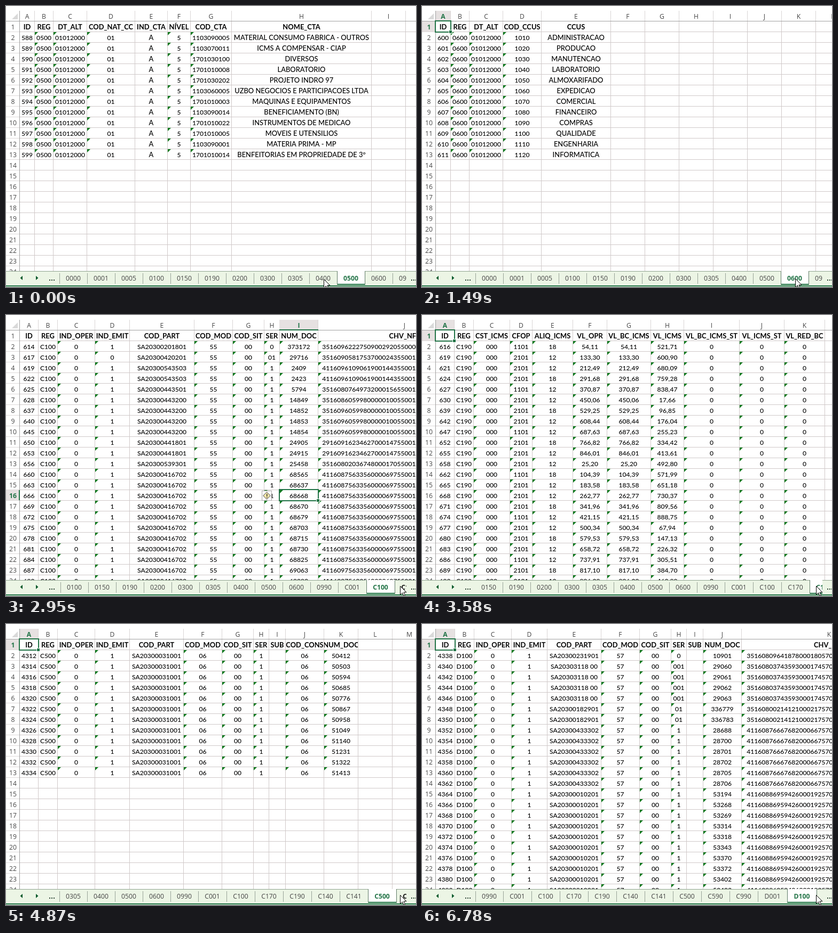
Recreate the animation shown at these times as an HTML page with a canvas. Size 768 px wide and 528 px high, loop 6.84 s.

```html
<!DOCTYPE html>
<html lang="pt">
<head>
<meta charset="utf-8">
<title>Planilha</title>
<style>
html, body { margin: 0; width: 768px; height: 528px; overflow: hidden; background: #fff; }
canvas { display: block; }
</style>
</head>
<body>
<canvas id="stage" width="768" height="528"></canvas>
<script>
const ctx = document.getElementById('stage').getContext('2d');
const LOOP = 6840, GREEN = '#217346', GRID = '#d0c9c9', EDGE = '#a0a0a0';
const UI = '12.2px "Open Sans", "Noto Sans", sans-serif';

// ---- Sheet contents ----
const seq = (n, make) => Array.from({ length: n }, (_, i) => make(i));
const lines = text => text.trim().split('\n').map(line => line.trim().split('|'));
const sheet = (head, widths, rows, selected = [0, 0]) =>
  ({ widths, selected, rows: [head.split('|'), ...rows] });
const docs = blocks => lines(blocks).flatMap(([part, series, key, numbers]) =>
  numbers.split(' ').map(number => ({ part, series, key: key.padEnd(44, '0010037'), number })));
const money = i => ((i * 7919 + 4211) % 90000 / 100 + 12).toFixed(2).replace('.', ',');

const accounts = lines(`
  A|1103090005|MATERIAL CONSUMO FABRICA - OUTROS
  A|1103070011|ICMS A COMPENSAR - CIAP
  A|1701030100|DIVERSOS
  A|1701010008|LABORATORIO
  A|1701030202|PROJETO INDRO 97
  A|1103060005|UZBO NEGOCIOS E PARTICIPACOES LTDA
  A|1701010003|MAQUINAS E EQUIPAMENTOS
  A|1103090014|BENEFICIAMENTO (BN)
  A|1701010022|INSTRUMENTOS DE MEDICAO
  A|1701010005|MOVEIS E UTENSILIOS
  A|1103090001|MATERIA PRIMA - MP
  A|1701010014|BENFEITORIAS EM PROPRIEDADE DE 3º`);

const operations = lines(`
  1FU|COMPRA MATERIA PRIMA
  1FO|COMPRA PARA INDUSTRI
  4CE|RET CONSERTO C/ESTOQ
  4DA|RETORNO DE VASILHAME
  1DA|COMPRA DE INDUSTRIAL
  4BA|RETORNO DE BENEFICIA
  1EH|COMPRA DE MATERIAL D
  4FD|RETORNO AMAZENAGEM
  4B1|OUTRAS ENTRADAS
  3CA|ENTRADA DE VASILHAME
  4ZC|ENTRADA COMB EMP
  1AD|COMPRA DE ATIVO IMOB
  1FS|COMPRA PARA INDUSTRI
  1EP|COMPRA DE MATERIAL D
  1FN|COMPRA PARA INDUSTRI
  2EF|ENTRADA DE EMPRESTIM
  1FP|COMPRA PARA INDUSTRI
  2BH|DEVOLUCAO DE VENDAS
  1EQ|COMPRA MATERIAL
  4GP|ENTRADA DE TRANSFERE
  1WY|ENTRADA PARA INDUSTR
  3IC|ENTRADA PARA INDUSTR
  1BJ|COMPRA DE SERVICOS D`);

const centers = ['ADMINISTRACAO', 'PRODUCAO', 'MANUTENCAO', 'LABORATORIO', 'ALMOXARIFADO', 'EXPEDICAO',
  'COMERCIAL', 'FINANCEIRO', 'COMPRAS', 'QUALIDADE', 'ENGENHARIA', 'INFORMATICA'];

const invoices = docs(`
  SA20300201801|0|3516096222750900292055000|373172
  SA20300420201|01|3516090581753700024355001|29716
  SA20300543503|1|4116096109061900144355001|2409 2423
  SA20300443501|1|3516080764973200015655001|5794
  SA20300443200|1|3516086059980000010055001|14849
  SA20300443200|1|3516096059980000010055001|14852 14853 14854
  SA20300441801|1|2916091623462700014755001|24905 24915
  SA20300539301|1|3516080203674800017055001|25458
  SA20300416702|1|4116087563356000069755001|68565 68637 68668 68670 68679 68703 68715 68730 68825
  SA20300416702|1|4116097563356000069755001|69063 69083`);
const invoiceIds = '614 617 619 622 625 628 637 640 645 650 653 656'.split(' ')
  .concat(seq(11, i => String(660 + 3 * i)));

const freights = docs(`
  SA20300231901|0|35160809641878000180570|10901
  SA20303118 00|001|35160803743593000174570|29060 29061 29062 29063
  SA20300182901|01|35160800214121000217570|336779 336783
  SA20300433302|1|41160876667682000667570|28688 28700 28701 28702 28705 28706
  SA20300010201|1|41160886959426000192570|53194 53268 53269 53314 53318 53343 53370 53372 53402 53403`);

const titles = lines(`
  1231|3|2280|006873|
  1236|24|7492|006857|
  1258|23756|424,65|006018|003
  1336|23782|509,58|006018|003
  1737|23829|339,72|006018|003
  1973|10020|13342,45|005413|
  1982|23865|594,51|006018|003
  2382|23895|509,58|006018|003
  2387|23941|509,58|006018|003
  2500|223|681,5|004358|2
  2549|9286|755|004219|`);

const taxHead = 'ID|REG|CST_ICMS|CFOP|ALIQ_ICMS|VL_OPR|VL_BC_ICMS|VL_ICMS|VL_BC_ICMS_ST|VL_ICMS_ST|VL_RED_BC';
const taxWidths = [35, 36, 68, 42, 76, 64, 82, 62, 104, 84, 76];
const taxRow = (id, reg, cfop, i) =>
  [String(id), reg, '000', cfop, i % 3 ? '12' : '18', money(i), money(i), money(i + 40), '0', '0', '0'];

const sheets = {
  '0400': sheet('ID|REG|COD_NAT|DESCR_NAT', [28, 35, 67, 168],
    operations.map((op, i) => [String(562 + i), '0400', ...op])),
  '0500': sheet('ID|REG|DT_ALT|COD_NAT_CC|IND_CTA|NÍVEL|COD_CTA|NOME_CTA', [28, 35, 63, 90, 61, 43, 77, 262],
    accounts.map(([kind, code, name], i) => [String(588 + i), '0500', '01012000', '01', kind, '5', code, name])),
  '0600': sheet('ID|REG|DT_ALT|COD_CCUS|CCUS', [28, 35, 63, 72, 130],
    centers.map((name, i) => [String(600 + i), '0600', '01012000', String(1010 + i * 10), name])),
  '0990': sheet('ID|REG|QTD_LIN_0', [28, 35, 74], [['612', '0990', '612']]),
  C001: sheet('ID|REG|IND_MOV', [28, 36, 63], [['613', 'C001', '0']]),
  C100: sheet('ID|REG|IND_OPER|IND_EMIT|COD_PART|COD_MOD|COD_SIT|SER|NUM_DOC|CHV_NFE',
    [35, 36, 70, 65, 121, 72, 59, 29, 72, 324],
    invoices.map((d, i) => [invoiceIds[i], 'C100', '0', i === 1 ? '0' : '1', d.part, '55', '00', d.series, d.number, d.key]),
    [8, 15]),
  C170: sheet('ID|REG|NUM_ITEM|COD_ITEM|DESCR_COMPL|QTD|UNID|VL_ITEM|VL_DESC|IND_MOV|CST_ICMS',
    [35, 36, 70, 92, 170, 56, 42, 64, 60, 63, 68],
    invoiceIds.map((id, i) => [String(+id + 1), 'C170', '1', String(10020314 + i * 37), operations[i][1],
      String(1 + i * 7 % 40), 'UN', money(i), '0', '0', '000'])),
  C190: sheet(taxHead, taxWidths, invoiceIds.map((id, i) => taxRow(+id + 2, 'C190', i % 4 ? '2101' : '1101', i))),
  C140: sheet('ID|REG|IND_EMIT|IND_TIT|DESC_TIT|NUM_TIT|QTD_PARC|VL_TIT|Participante|Número da NF|Modelo|Série',
    [35, 36, 67, 55, 63, 70, 73, 60, 64, 64, 64, 64],
    titles.map(([id, number, value, part, series]) => [id, 'C140', '1', '00', '', number.padStart(9, '0'), '1',
      value, `SA203${part}01`, number, '01', series])),
  C141: sheet('ID|REG|NUM_PARC|DT_VCTO|VL_PARC', [35, 36, 74, 66, 64],
    titles.map(([id, , value], i) => [String(+id + 1), 'C141', '01', `${10 + i}102016`, value])),
  C500: sheet('ID|REG|IND_OPER|IND_EMIT|COD_PART|COD_MOD|COD_SIT|SER|SUB|COD_CONS|NUM_DOC',
    [35, 36, 70, 65, 101, 72, 59, 29, 31, 72, 64],
    seq(12, i => [String(4312 + 2 * i), 'C500', '0', '1', 'SA20300031001', '06', '00', '1', '', '06', String(50412 + i * 91)])),
  C590: sheet(taxHead, taxWidths, seq(12, i => taxRow(4313 + 2 * i, 'C590', '1252', i + 30))),
  C990: sheet('ID|REG|QTD_LIN_C', [35, 36, 75], [['4336', 'C990', '3724']]),
  D001: sheet('ID|REG|IND_MOV', [35, 36, 63], [['4337', 'D001', '0']]),
  D100: sheet('ID|REG|IND_OPER|IND_EMIT|COD_PART|COD_MOD|COD_SIT|SER|SUB|NUM_DOC|CHV_CTE',
    [36, 36, 70, 67, 101, 72, 59, 29, 31, 72, 328],
    freights.map((d, i) => [String(4338 + 2 * i), 'D100', '0', '1', d.part, '57', '00', d.series, '', d.number, d.key]))
};

// ---- Timeline ----
const tabs = ('0000 0001 0005 0100 0150 0190 0200 0300 0305 0400 0500 0600 0990 ' +
  'C001 C100 C170 C190 C140 C141 C500 C590 C990 D001 D100 D190').split(' ');
const tabWidth = name => ({ C: 53, D: 55 })[name[0]] || 52;

// start, sheet, duration of the tab strip's slide
const visits = [[0, '0500'], [590, '0400'], [1080, '0500'], [1460, '0600'], [1920, '0990', 150],
  [2480, 'C001', 150], [2830, 'C100', 180], [3170, 'C170', 150], [3580, 'C190', 210], [4020, 'C140', 120],
  [4400, 'C141', 150], [4750, 'C500', 150], [5130, 'C590', 120], [5480, 'C990', 150], [5890, 'D001', 150],
  [6240, 'D100', 150]];

// start, end, from, to
const moves = [[590, 950, [595, 513], [648, 513]], [1080, 1260, [648, 513], [698, 512]],
  [1460, 1760, [698, 512], [735, 510]], [2200, 2480, [735, 510], [738, 509]]];

function pointerAt(t) {
  const [start, end, from, to] = moves.filter(m => m[0] <= t).pop() || moves[0];
  const p = Math.min(1, Math.max(0, (t - start) / (end - start)));
  const eased = p * p * (3 - 2 * p);
  return from.map((v, i) => Math.round(v + (to[i] - v) * eased));
}

// ---- Drawing ----
function rect(x, y, w, h, color) {
  ctx.fillStyle = color;
  ctx.fillRect(x, y, w, h);
}
function shape(points, color) {
  ctx.beginPath();
  points.forEach(([x, y]) => ctx.lineTo(x, y));
  ctx.closePath();
  ctx.fillStyle = color;
  ctx.fill();
}
function label(text, x, y, font, color) {
  ctx.font = font;
  ctx.fillStyle = color;
  ctx.fillText(text, x, y);
}
function clipped(x, y, w, h, draw) {
  ctx.save();
  ctx.beginPath();
  ctx.rect(x, y, w, h);
  ctx.clip();
  draw();
  ctx.restore();
}

function drawCell(text, x, y, width, isHead) {
  const numeric = /^[\d,]+$/.test(text);
  const size = numeric || /\d{3}/.test(text) ? 12.1 : 12.9;
  clipped(x + 1, y, width - 1, 19, () =>
    label(text, x + (width + 1) / 2, y + 15, `${isHead ? 700 : 500} ${size}px Lato, sans-serif`, '#000'));
  return numeric;
}

function drawSheet({ widths, rows, selected }, showSelection) {
  const edges = [25];
  for (let c = 0; edges[c] < 768; c++) edges.push(edges[c] + (widths[c] || 64));
  const [selCol, selRow] = showSelection ? selected : [-1, -1];

  shape([[22, 14], [22, 25], [11, 25]], '#d9d9d9');
  for (let c = 0; c + 1 < edges.length; c++) {
    const x = edges[c], w = edges[c + 1] - x, active = c === selCol;
    if (active) rect(x, 9, w, 19, '#e6e1e1');
    rect(x + w, 9, 1, 19, '#d9d5d5');
    rect(x + w, 29, 1, 469, GRID);
    label(String.fromCharCode(65 + c), x + (w + 1) / 2, 24, (active ? 'bold ' : '') + UI, active ? GREEN : '#444');
  }
  for (let r = 0; r < 24; r++) {
    const y = 29 + 20 * r, active = r === selRow;
    if (active) rect(0, y, 25, 19, '#e6e1e1');
    rect(0, y + 19, 25, 1, '#dedada');
    rect(26, y + 19, 742, 1, GRID);
    label(r + 1, 13, y + 15, (active ? 'bold ' : '') + UI, active ? GREEN : '#444');
  }
  rect(25, 9, 1, 489, EDGE);
  rect(0, 28, 768, 1, EDGE);

  rows.forEach((row, r) => row.forEach((text, c) => {
    if (!text || edges[c] >= 768) return;
    const x = edges[c], y = 29 + 20 * r;
    const numeric = drawCell(text, x, y, edges[c + 1] - x, r === 0);
    if (numeric && c > 0) shape([[x + 1, y], [x + 7, y], [x + 1, y + 6]], '#0f7a1f');
  }));

  if (showSelection) drawSelection(edges[selCol], 29 + 20 * selRow, edges[selCol + 1]);
}

function drawSelection(x, y, right) {
  rect(x, 27, right - x + 1, 2, GREEN);
  rect(24, y, 2, 19, GREEN);
  ctx.strokeStyle = GREEN;
  ctx.lineWidth = 2;
  ctx.strokeRect(x, y - 1, right - x + 1, 21);
  rect(right - 3, y + 16, 7, 7, '#fff');
  rect(right - 2, y + 17, 5, 5, GREEN);
  if (x > 25) drawWarning(x - 33, y + 1);
}

function drawWarning(x, y) {
  rect(x, y, 19, 19, '#ababab');
  rect(x + 1, y + 1, 17, 17, '#fafafa');
  shape([[x + 9.5, y + 2], [x + 17, y + 9.5], [x + 9.5, y + 17], [x + 2, y + 9.5]], '#777');
  shape([[x + 9.5, y + 3.5], [x + 15.5, y + 9.5], [x + 9.5, y + 15.5], [x + 3.5, y + 9.5]], '#f8e7a8');
  rect(x + 9, y + 6, 1.5, 5, '#333');
  rect(x + 9, y + 12, 1.5, 1.5, '#333');
}

function drawTabs(current, offset, hoverX) {
  rect(0, 498, 768, 30, '#ecf5e5');
  rect(0, 498, 768, 1, '#8fa38f');
  rect(0, 525, 768, 2, GREEN);
  shape([[31, 507], [31, 515], [26.5, 511]], '#0b5a2c');
  shape([[56, 507], [56, 515], [60.5, 511]], '#0b5a2c');
  for (const start of [81, 759]) for (let i = 0; i < 3; i++) rect(start + i * 4, 514, 2, 2, '#26402f');

  const first = Math.max(0, tabs.indexOf(current) - 11);
  clipped(100, 498, 650, 27, () => {
    let x = 100 + Math.round(offset) - (first ? tabWidth(tabs[first - 1]) : 0);
    for (const name of tabs.slice(Math.max(0, first - 1))) {
      const w = tabWidth(name), active = name === current;
      const hovered = hoverX >= x && hoverX < x + w;
      if (active) {
        rect(x, 498, w + 1, 26, '#5f7a68');
        rect(x + 1, 498, w - 1, 24, '#fff');
        rect(x + 1, 522, w - 1, 2, GREEN);
      } else {
        if (tabs[tabs.indexOf(name) - 1] !== current) rect(x, 502, 1, 20, '#98a398');
      }
      label(name, x + w / 2, 516, (active || hovered ? 'bold ' : '') + UI,
        active ? GREEN : hovered ? '#111' : '#444');
      x += w;
    }
  });
}

function drawPointer(x, y) {
  const outline = [[0, 0], [0, 16], [4, 12.5], [6.5, 18.5], [9, 17.5], [6.5, 11.5], [11.5, 11.5]];
  ctx.lineJoin = 'miter';
  ctx.lineWidth = 1;
  ctx.strokeStyle = '#000';
  shape(outline.map(([dx, dy]) => [x + dx + 0.5, y + dy + 0.5]), '#fff');
  ctx.stroke();
}

function render(now) {
  const t = now % LOOP;
  const [start, name, slide] = visits.filter(v => v[0] <= t).pop();
  const remaining = slide ? Math.max(0, 1 - (t - start) / slide) : 0;
  const [px, py] = pointerAt(t);
  const touched = t >= 290;

  rect(0, 0, 768, 528, '#fff');
  ctx.textAlign = 'center';
  drawSheet(sheets[name], touched);
  drawTabs(name, 52 * remaining ** 3, touched ? px : -1);
  drawPointer(px, py);
}

const began = performance.now();
function tick() {
  render(performance.now() - began);
  requestAnimationFrame(tick);
}
tick();
</script>
</body>
</html>
```
